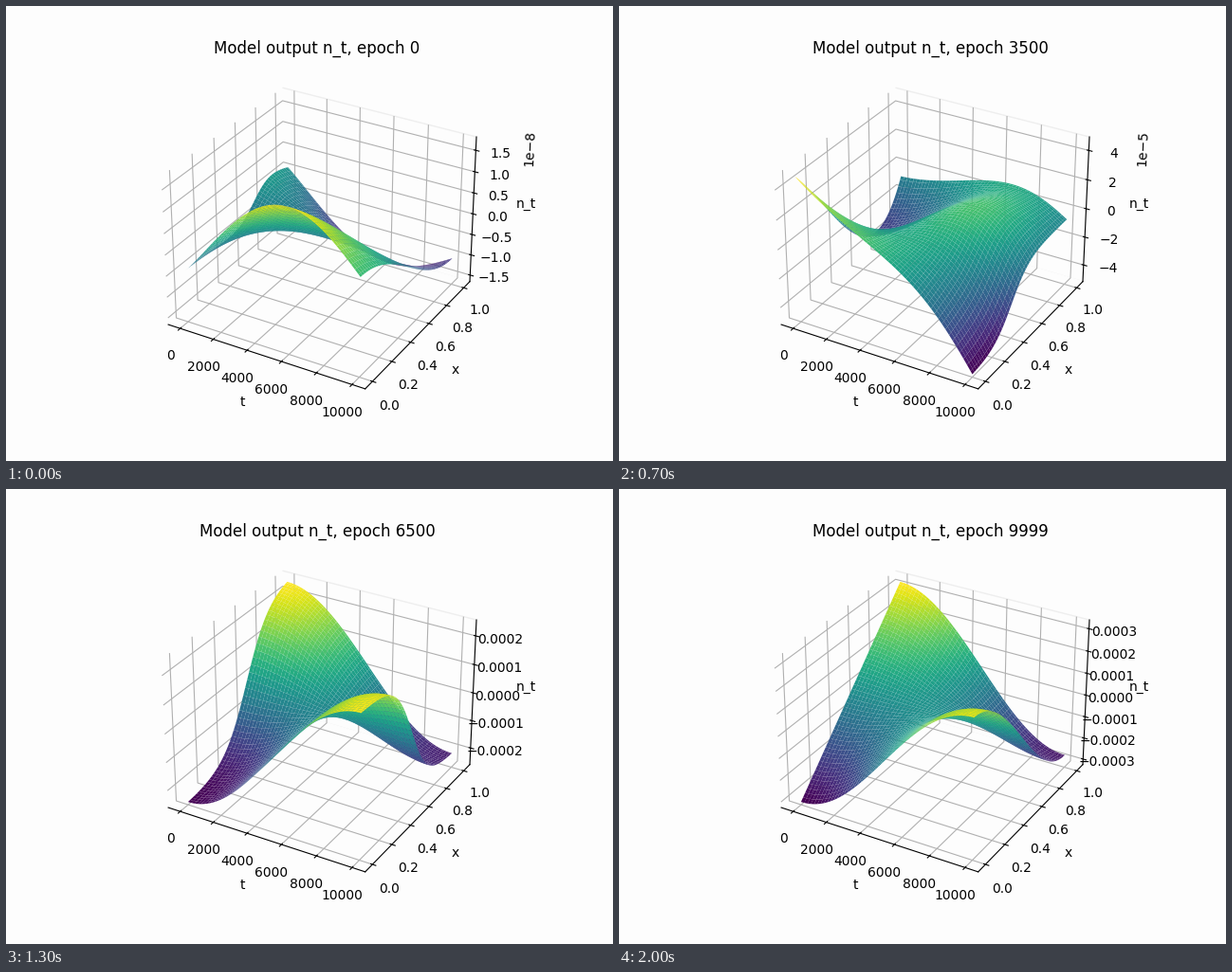
A matplotlib script that plays this animation: 640x480 px, repeating every 2100 ms.

```python
import numpy as np
import matplotlib.pyplot as plt
from matplotlib.animation import FuncAnimation
from numpy import pi, sin, cos

FRAMES = 21
BG = "#fdfdfd"
T, X = np.meshgrid(np.linspace(0, 1, 100), np.linspace(0, 1, 100), indexing="ij")


def ease(u):
    return (1 - cos(pi * u)) / 2


def step(u, centre, k):
    return 1 / (1 + np.exp(-k * (u - centre)))


def mix(a, b, f):
    return a + (b - a) * f


# Learned surfaces: an edge at t=0 blends into an edge at t=1, plus a bump.
def saddle(t, x):
    start = .338 - .24 * x**2 + .4 * step(x, .65, 12)
    end = .667 - .517 * ease(x)
    return mix(start, end, t) + (.48 - .8 * x) * sin(pi * t**1.1)


def dome(t, x):
    start = .69 - .14 * x - .28 * sin(pi * x)
    end = .6 * step(x, .43, 8)
    bump = .47 * (1 - x) + .4 * sin(pi * x)
    return mix(start, end, t) + bump * sin(pi * t**1.2)


def wave(t, x):
    start = 1 - 1.15 * x - 1.44 * x**2 + 2.03 * x**3
    end = .46 * step(x, .4, 11)
    bump = .15 + .2 * sin(pi * x)
    return mix(start, end, t) + bump * sin(pi * t**1.7)


def peak(t, x):
    start = .24 - .4 * x + 1.18 * step(x, .71, 13)
    end = .67 + .08 * x - .75 * step(x, .62, 15)
    return mix(start, end, t) + .15 * (1 - x**2) * sin(pi * t**2)


def twist(t, x):
    end = .96 - .877 * step(x, .53, 11)
    return mix(step(x, .58, 8.5), end, ease(t))


def settled(t, x):
    return mix(x, .955 - .885 * ease(x), ease(t))


SURFACES = {0: saddle, 4: dome, 7: wave, 9: peak, 13: twist, 20: settled}

# Size of the lowest and highest output as training goes on.
RANGE_STEPS = [0, 4, 7, 9, 13, 16, 20]
DOWN = [1.593e-8, 5.445e-8, 5.0e-5, .955e-4, 2.51e-4, 2.977e-4, 3.13e-4]
UP = [1.741e-8, 2.915e-8, 4.71e-5, 1.005e-4, 2.446e-4, 2.951e-4, 3.26e-4]


def unit(w):
    return (w - w.min()) / (w.max() - w.min())


def growth(i, sizes):
    return np.exp(np.interp(i, RANGE_STEPS, np.log(sizes)))


def height(i):
    a = max(k for k in SURFACES if k <= i)
    b = min(k for k in SURFACES if k >= i)
    f = (i - a) / max(b - a, 1)
    w = unit(mix(unit(SURFACES[a](T, X)), unit(SURFACES[b](T, X)), f))
    return mix(-growth(i, DOWN), growth(i, UP), w)


fig = plt.figure(figsize=(6.4, 4.8), dpi=100, facecolor=BG)
ax = fig.add_subplot(projection="3d")


def draw(i):
    ax.clear()
    ax.set_facecolor(BG)
    for axis in (ax.xaxis, ax.yaxis, ax.zaxis):
        axis.set_pane_color(BG)
    ax.yaxis.pane.set_edgecolor("#eeeeee")
    ax.plot_surface(1e4 * T, X, height(i), cmap="viridis")
    ax.set_xlabel("t")
    ax.set_ylabel("x")
    ax.set_zlabel("n_t")
    ax.set_title(f"Model output n_t, epoch {min(500 * i, 9999)}")
    return []


anim = FuncAnimation(fig, draw, frames=FRAMES, interval=100,
                     repeat=True, repeat_delay=0)
plt.show()
```
